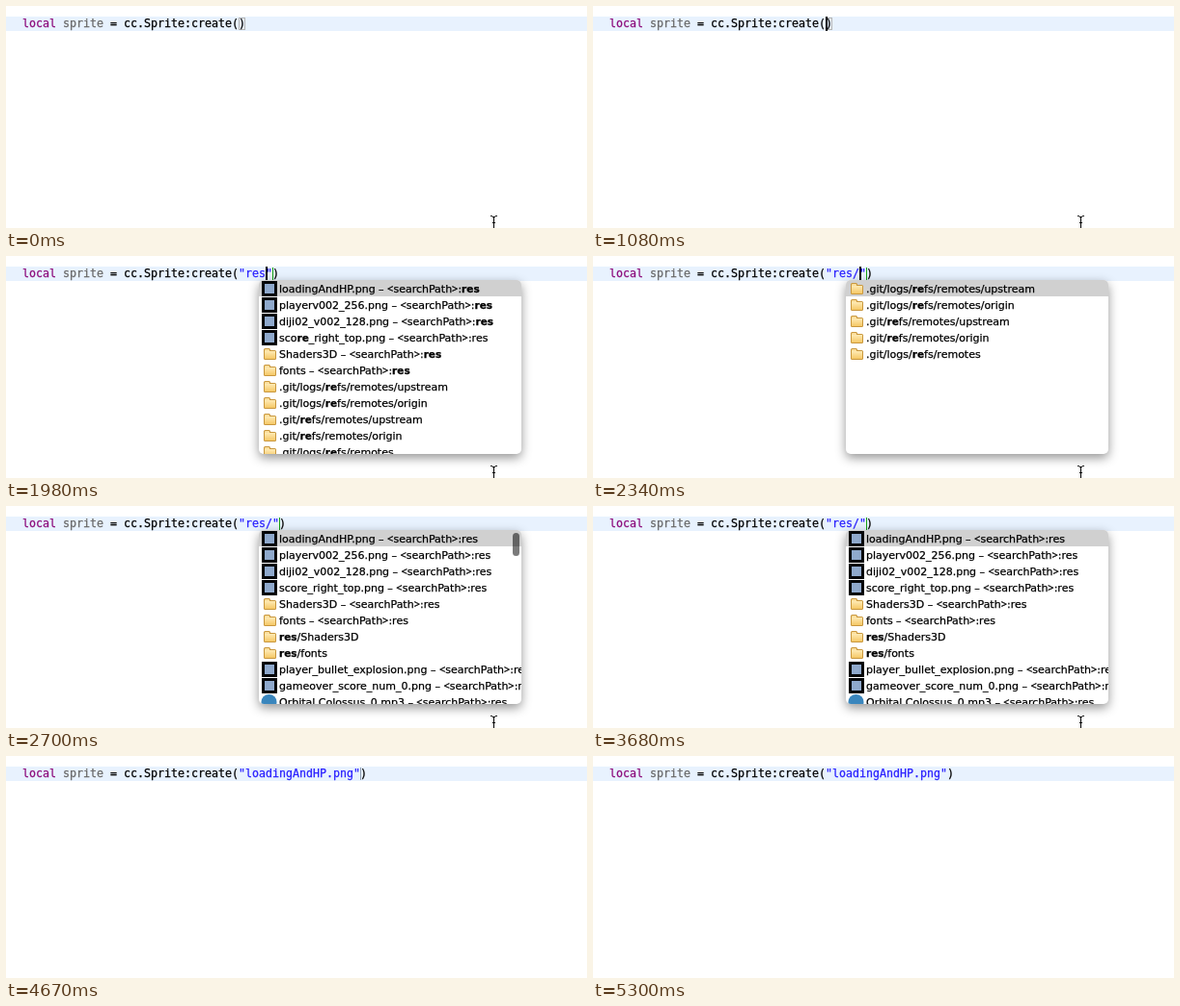
Write an HTML page with a canvas that moves like this. It is 602 px wide and 231 px high and loops after 7300 ms.

```html
<!DOCTYPE html>
<html lang="en">
<head>
<meta charset="utf-8">
<title>Path completion</title>
<style>
html, body { margin: 0; width: 100%; height: 100%; overflow: hidden; background: #fff; }
canvas { display: block; width: 602px; height: 231px; }
</style>
</head>
<body>
<canvas id="stage" width="602" height="231"></canvas>
<script>
const ctx = document.getElementById('stage').getContext('2d');
const LOOP = 7300;
const CODE_FONT = '11.63px "DejaVu Sans Mono", monospace';
const LIST_FONT = '11px "DejaVu Sans", sans-serif';
const BOLD_FONT = 'bold 10.5px "DejaVu Sans", sans-serif';
const ANGLE_FONT = '11px "Noto Sans", sans-serif';
const LEFT = 17, CHAR = 7, ARG = 32;
const POPUP = { x: 262, y: 25, w: 272, h: 181 };
const ROW = 17;

// Each row is [icon, label]; asterisks enclose the matched letters.
const plain = ' – <searchPath>:res';
const match = ' – <searchPath>:*res*';
const gitRows = [
  ['folder', '.git/logs/*re*fs/remotes/upstream'],
  ['folder', '.git/logs/*re*fs/remotes/origin'],
  ['folder', '.git/*re*fs/remotes/upstream'],
  ['folder', '.git/*re*fs/remotes/origin'],
  ['folder', '.git/logs/*re*fs/remotes']
];
const broadList = [
  ['image', 'loadingAndHP.png' + match],
  ['image', 'playerv002_256.png' + match],
  ['image', 'diji02_v002_128.png' + match],
  ['image', 'sco*re*_right_top.png' + plain],
  ['folder', 'Shaders3D' + match],
  ['folder', 'fonts' + match],
  ...gitRows
];
const finalList = [
  ['image', 'loadingAndHP.png' + plain],
  ['image', 'playerv002_256.png' + plain],
  ['image', 'diji02_v002_128.png' + plain],
  ['image', 'score_right_top.png' + plain],
  ['folder', 'Shaders3D' + plain],
  ['folder', 'fonts' + plain],
  ['folder', '*res*/Shaders3D'],
  ['folder', '*res*/fonts'],
  ['image', 'player_bullet_explosion.png' + plain],
  ['image', 'gameover_score_num_0.png' + plain],
  ['music', 'Orbital Colossus_0.mp3' + plain]
];

// Typed argument: null means the parentheses are still empty.
const typed = [[0, null], [1170, ''], [1530, 'r'], [1620, 're'], [1980, 'res'],
  [2250, 'res/'], [3860, 'loadingAndHP.png']];
const lists = [[0, null], [1980, broadList], [2340, gitRows], [2700, finalList], [3860, null]];
const caretOn = [[0, false], [180, true], [720, false], [1080, true], [2700, false],
  [3240, true], [3680, false], [3860, true], [4310, false], [4850, true], [5300, false]];
const thumbAlpha = [[0, 0], [2700, 0.52], [3150, 0.26], [3240, 0]];
const exitColor = [[0, null], [1260, '#8e9db2'], [1980, '#14a014'], [3860, '#8e9db2'], [5300, null]];

function at(steps, t) {
  let value = steps[0][1];
  for (const [start, v] of steps) if (t >= start) value = v;
  return value;
}

function rect(x, y, w, h, color) {
  ctx.fillStyle = color;
  ctx.fillRect(x, y, w, h);
}

function round(x, y, w, h, r, color) {
  ctx.fillStyle = color;
  ctx.beginPath();
  ctx.roundRect(x, y, w, h, r);
  ctx.fill();
}

// A hairline stroke gives the slightly heavier smoothed look.
function write(text, x, y, font, color) {
  ctx.font = font;
  ctx.fillStyle = ctx.strokeStyle = color;
  ctx.lineWidth = 0.25;
  ctx.fillText(text, x, y);
  ctx.strokeText(text, x, y);
}

const colX = col => LEFT + col * CHAR;
const code = (text, col, color) => write(text, colX(col), 22, CODE_FONT, color);

function drawLine(t) {
  const arg = at(typed, t);
  rect(0, 11, 602, 15, '#e8f2fe');
  code('local', 0, '#8c0c7c');
  code('sprite', 6, '#686868');
  code('=', 13, '#000');
  code('cc.Sprite:create(', 15, '#000');
  let caret = ARG, end = ARG;
  if (arg === null) {
    ctx.strokeStyle = '#b4b4b4';
    ctx.lineWidth = 1;
    ctx.strokeRect(colX(ARG) + 0.5, 12.5, 6, 12);
  } else {
    code('"' + arg + '"', ARG, '#2a20ff');
    caret += 1 + arg.length;
    end = caret + 1;
  }
  code(')', end, '#000');
  const exit = at(exitColor, t);
  if (exit) rect(colX(end), 12, 1, 13, exit);
  if (at(caretOn, t)) rect(colX(caret), 11, 2, 15, '#000');
}

function drawIcon(kind, y) {
  if (kind === 'image') {
    rect(265, y, 16, 16, '#050608');
    rect(268, y + 3, 10, 10, '#8fa9cc');
  } else if (kind === 'music') {
    ctx.fillStyle = '#3a86bd';
    ctx.beginPath();
    ctx.arc(272.5, y + 8, 8, 0, Math.PI * 2);
    ctx.fill();
  } else {
    round(267, y + 2, 7, 5, 1.5, '#c9973d');
    round(267, y + 4, 13, 10, 1.5, '#c9973d');
    round(268, y + 3, 5, 4, 1, '#fbdf9d');
    const shade = ctx.createLinearGradient(0, y + 5, 0, y + 13);
    shade.addColorStop(0, '#ffeab4');
    shade.addColorStop(1, '#f5c866');
    rect(268, y + 5, 11, 8, shade);
  }
}

function drawLabel(label, x, y) {
  for (const part of label.split(/(\*[^*]+\*|[<>])/)) {
    const bold = part[0] === '*';
    const text = bold ? part.slice(1, -1) : part;
    const font = bold ? BOLD_FONT : /[<>]/.test(part) ? ANGLE_FONT : LIST_FONT;
    write(text, x, y, font, '#000');
    x += ctx.measureText(text).width;
  }
}

function drawPopup(rows, thumb) {
  const { x, y, w, h } = POPUP;
  ctx.save();
  ctx.shadowColor = 'rgba(0,0,0,0.42)';
  ctx.shadowBlur = 11;
  ctx.shadowOffsetY = 4;
  round(x, y, w, h, 5, '#fff');
  ctx.restore();

  ctx.save();
  ctx.beginPath();
  ctx.roundRect(x, y, w, h, 5);
  ctx.clip();
  rect(x, y, w, 17, '#d0d0d0');
  rows.forEach(([icon, label], i) => {
    const top = 26 + i * ROW;
    drawIcon(icon, top);
    drawLabel(label, 283, top + 12);
  });
  if (thumb) round(525, 28, 7, 24, 3.5, `rgba(0,0,0,${thumb})`);
  ctx.restore();
}

function drawPointer() {
  rect(502, 218, 2, 1, '#000');
  rect(507, 218, 2, 1, '#000');
  rect(504, 219, 3, 1, '#000');
  rect(505, 220, 1, 11, '#000');
  rect(504, 225, 3, 1, '#000');
}

function draw(t) {
  rect(0, 0, 602, 231, '#fff');
  drawLine(t);
  const rows = at(lists, t);
  if (rows) drawPopup(rows, at(thumbAlpha, t));
  if (t < 4670) drawPointer();
}

const start = performance.now();
function tick() {
  draw((performance.now() - start) % LOOP);
  requestAnimationFrame(tick);
}
tick();
</script>
</body>
</html>
```
